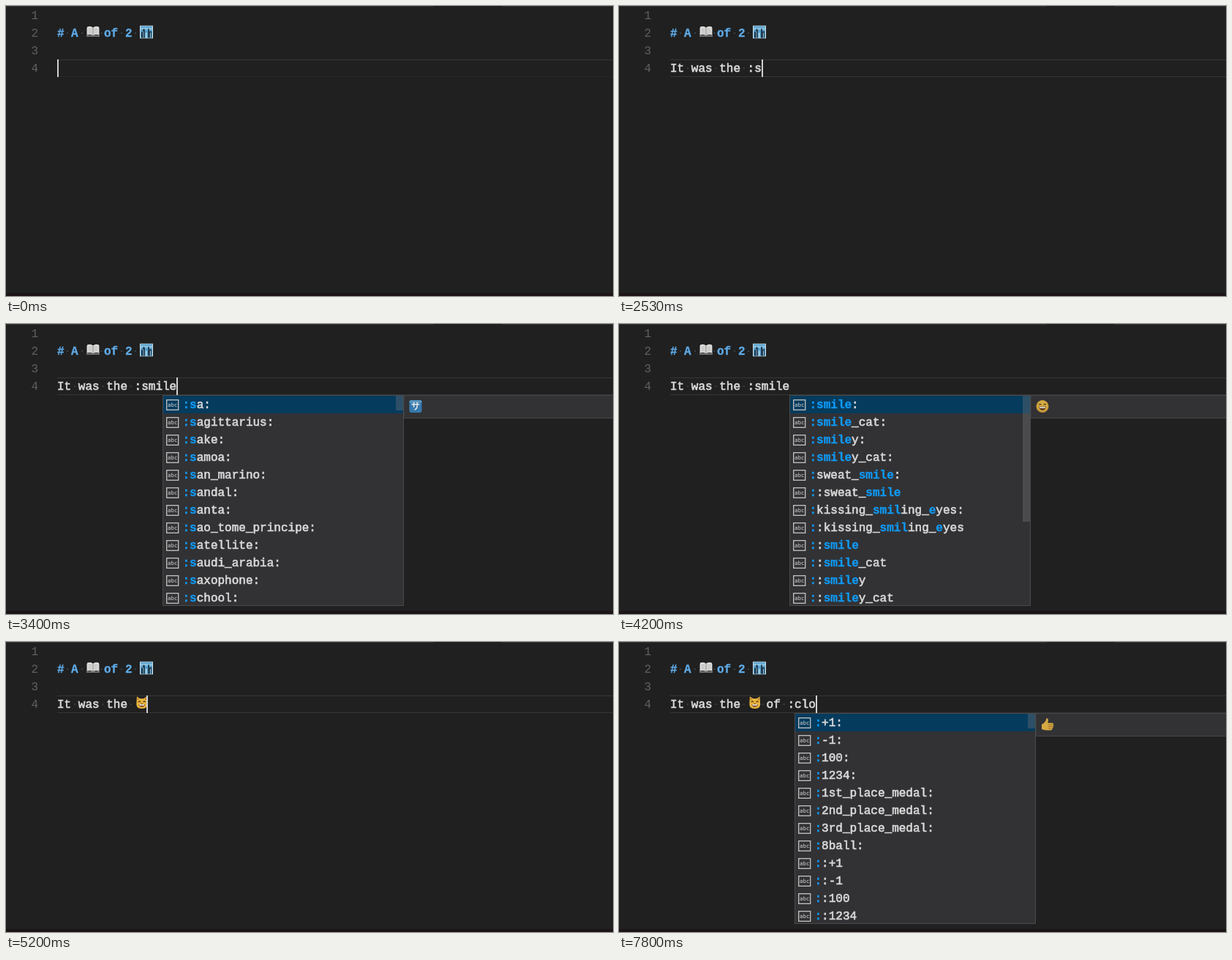
An HTML page for the animation above (8000 ms loop, 830 by 396 pixels).

```html
<!DOCTYPE html>
<html lang="en">
<head>
<meta charset="utf-8">
<title>Emoji completion in an editor</title>
<style>
  html, body { margin: 0; width: 100%; height: 100%; overflow: hidden; background: #202020; }
  svg { display: block; width: 830px; height: 396px; }
  text { font: 16px "Liberation Mono", "DejaVu Sans Mono", monospace; }
  .code { fill: #d9d9d9; stroke: #d9d9d9; stroke-width: .65; }
  .num { fill: #606060; text-anchor: end; }
  .head { fill: #5fabe8; stroke: #5fabe8; stroke-width: .3; font-weight: bold; }
  .hit { fill: #0f9bf7; stroke: #0f9bf7; stroke-width: .3; font-weight: bold; }
  .abc { font: 7.5px "DejaVu Sans Mono", monospace; fill: #d2d2d2; text-anchor: middle; }
</style>
</head>
<body>
<svg viewBox="0 0 830 396">
  <defs>
    <symbol id="book" viewBox="0 0 18 18">
      <path d="M0 4 L1 3 V14 H8 L9 15 L10 14 H17 V3 L18 4 V16 H0Z" fill="#6f7174"/>
      <path d="M1 2.5 Q6 .8 9 3.5 Q12 .8 17 2.5 V13.5 Q12 12.2 9 14.5 Q6 12.2 1 13.5Z" fill="#dededc"/>
      <path d="M9 3.5 V14.5" stroke="#858585"/>
      <path d="M2.5 5 H7.5 M2.5 7 H7.5 M2.5 9 H7.5 M2.5 11 H7.5 M10.5 5 H15.5 M10.5 7 H15.5 M10.5 9 H15.5 M10.5 11 H15.5" stroke="#b0b0b0" stroke-width=".8"/>
    </symbol>
    <symbol id="city" viewBox="0 0 18 18">
      <rect width="18" height="18" fill="#c9dde6"/>
      <rect x="1" y="1" width="16" height="16" fill="#559fce"/>
      <path d="M1 3 H17 V6 H1Z" fill="#8ac2df"/>
      <path d="M2 17 V9 H4 V6 L5.5 4.5 L7 6 V17Z M11 17 V6 L12 3.5 L13 6 V8 H16 V17Z" fill="#203b50"/>
      <path d="M7.5 17 V10 H10 V17Z M14 10 H15 V17 H14Z M4.5 8 H5.3 V17 H4.5Z" fill="#9cc9df"/>
    </symbol>
    <symbol id="sa" viewBox="0 0 18 18">
      <rect x=".5" y=".5" width="17" height="17" rx="3" fill="#3585c2"/>
      <rect x=".5" y=".5" width="17" height="4" rx="2" fill="#5ba5d8"/>
      <text x="9" y="13.5" text-anchor="middle" fill="#fff" style="font:bold 12.5px 'Noto Sans CJK JP','Noto Sans CJK',sans-serif">サ</text>
    </symbol>
    <symbol id="grin" viewBox="0 0 18 18">
      <circle cx="9" cy="9" r="8.6" fill="#d99c30"/>
      <circle cx="9" cy="8.2" r="7.5" fill="#eebf45"/>
      <path d="M4.2 7 Q5.7 4.6 7.2 7 M10.8 7 Q12.3 4.6 13.8 7" fill="none" stroke="#553313" stroke-width="1.2"/>
      <path d="M4 9.3 H14 Q13.4 14.4 9 14.4 Q4.6 14.4 4 9.3Z" fill="#6b3d17"/>
      <path d="M4.7 9.8 H13.3 L12.8 11.6 H5.2Z" fill="#f4f0e4"/>
    </symbol>
    <symbol id="cat" viewBox="0 0 18 18">
      <path d="M1.5 9 L2 .6 L6.5 3.4 H11.5 L16 .6 L16.5 9 Q18 17.4 9 17.4 Q0 17.4 1.5 9Z" fill="#e9b53d"/>
      <path d="M2.7 5.5 L3 2.4 L5.3 4Z M15.3 5.5 L15 2.4 L12.7 4Z" fill="#a86a2b"/>
      <path d="M4 8.3 Q5.5 5.6 7 8.3 M11 8.3 Q12.5 5.6 14 8.3" fill="none" stroke="#49300f" stroke-width="1.3"/>
      <path d="M4.5 11 Q6.5 11.6 9 10.6 Q11.5 11.6 13.5 11 Q13 15 9 15 Q5 15 4.5 11Z" fill="#6b3d17"/>
      <path d="M5.2 11.6 Q9 11.6 12.8 11.6 L12 13.2 H6Z" fill="#fff"/>
      <path d="M8 9.2 H10 L9 10.4Z" fill="#7d4a24"/>
    </symbol>
    <symbol id="thumb" viewBox="0 0 18 18">
      <path d="M1 9 Q4.5 7.5 6.5 4 L7.5 .8 Q10.3 .3 9.8 4 L9.3 7 H15.5 Q17.5 7.3 16.8 9.2 Q18 10.5 16.6 12 Q17 13.8 15.6 14.4 Q15.8 16.8 13 17 H7 Q4 16.8 1 15.5Z" fill="#f0bd45"/>
      <path d="M10 9.5 H16.5 M10 12 H16.5 M10 14.5 H15.5" stroke="#a8742a" stroke-width=".9"/>
    </symbol>
  </defs>
  <rect width="830" height="396" fill="#202020"/>
  <path d="M0 .5 H585 M678 .5 H830" stroke="#353535"/>
  <rect y="392" width="830" height="4" fill="#1c1417"/>
  <path d="M70 73.5 H830" stroke="#353535"/>
  <path id="under" d="M70 96.5 H830" stroke="#353535"/>
  <g id="page"></g>
  <g id="line"></g>
  <rect id="caret" y="73" width="2" height="24" fill="#d0d0d0"/>
  <g id="menus"></g>
</svg>
<script>
const LOOP = 8000, LEFT = 70, CH = 9.6, CAT_W = 16.4, ROW = 24;
const $ = id => document.getElementById(id);

function add(parent, tag, attrs, content) {
  const el = document.createElementNS('http://www.w3.org/2000/svg', tag);
  for (const k in attrs) el.setAttribute(k, attrs[k]);
  if (content !== undefined) el.textContent = content;
  parent.appendChild(el);
  return el;
}
const emoji = (parent, name, x, y, size = 18, opacity = 1) =>
  add(parent, 'use', { href: '#' + name, x, y, width: size, height: size, opacity });
const dot = (parent, x, y, fill) => add(parent, 'circle', { cx: x, cy: y, r: 1.1, fill });

// Fixed page: line numbers and heading
const page = $('page');
for (let i = 0; i < 4; i++) add(page, 'text', { class: 'num', x: 44, y: 18 + ROW * i }, i + 1);
[['#', 70], ['A', 89], ['of', 134], ['2', 163]].forEach(([s, x]) =>
  add(page, 'text', { class: 'head', x, y: 42 }, s));
[84, 104, 130.5, 158, 177].forEach(x => dot(page, x, 37, '#3a4a56'));
emoji(page, 'book', 110, 26);
emoji(page, 'city', 183, 26.5);

// Typed line: [time, text], '@' stands for the cat
const steps = [[0, '']];
const type = (text, ...times) => {
  let s = steps[steps.length - 1][1];
  times.forEach((t, i) => steps.push([t, s += text[i]]));
};
type('It ', 500, 670, 730);
type('was', 1000, 1130, 1270);
type(' the ', 1470, 1530, 1600, 1670, 1730);
type(':s', 2000, 2470);
type('mile', 3000, 3070, 3130, 3270);
steps.push([5070, 'It was the @']);
type(' of ', 5530, 6000, 6070, 6130);
type(':clo', 6530, 7400, 7530, 7670);

const hidden = [[3730, 4270], [4730, 5070]];  // caret blinked off

// Menus: square brackets mark matched letters
const menus = [
  { from: 3200, to: 3600, x: 214, thumb: 20, docs: ['sa'],
    rows: 'a: agittarius: ake: amoa: an_marino: andal: anta: ao_tome_principe: atellite: audi_arabia: axophone: chool:'
      .split(' ').map(s => '[:s]' + s) },
  { from: 3600, to: 5070, x: 233, thumb: 172, docs: ['grin', 'cat'], down: 4470,
    rows: ('[:smile]: [:smile]_cat: [:smile]y: [:smile]y_cat: [:]sweat_[smile]: [:]:sweat_[smile] ' +
      '[:]kissing_[smil]ing_[e]yes: [:]:kissing_[smil]ing_[e]yes [:]:[smile] [:]:[smile]_cat [:]:[smile]y [:]:[smile]y_cat').split(' ') },
  { from: 7330, to: LOOP, x: 240, thumb: 20, docs: ['thumb'],
    rows: '+1: -1: 100: 1234: 1st_place_medal: 2nd_place_medal: 3rd_place_medal: 8ball: :+1 :-1 :100 :1234'
      .split(' ').map(s => '[:]' + s) }
];

function buildMenu(m) {
  const { x } = m, g = m.el = add($('menus'), 'g', {});
  add(g, 'rect', { x: x + 330, y: 97.5, width: 840 - x - 330, height: 31, fill: '#323235', stroke: '#454547' });
  m.icon = emoji(g, m.docs[0], x + 337, 103.5, 18, .86);
  add(g, 'rect', { x: x + .5, y: 97.5, width: 329, height: 287, fill: '#323235', stroke: '#4a4a4c' });
  m.bar = add(g, 'rect', { x: x + 1, width: 328, height: ROW, fill: '#053b5d' });
  add(g, 'rect', { x: x + 319, y: 98, width: 10, height: m.thumb, fill: '#797979', opacity: .35 });
  m.rows.forEach((row, i) => {
    const y = 110 + ROW * i;
    add(g, 'rect', { x: x + 5.7, y: y - 6.3, width: 16, height: 13.6, fill: 'none', stroke: '#c4c4c4', 'stroke-width': 1.3 });
    add(g, 'text', { class: 'abc', x: x + 13.7, y: y + 3.4 }, 'abc');
    const line = add(g, 'text', { class: 'code', x: x + 27.5, y: y + 5 });
    row.split(/[\[\]]/).forEach((part, k) => {
      if (part) add(line, 'tspan', k % 2 ? { class: 'hit' } : {}, part);
    });
  });
}
menus.forEach(buildMenu);

let shown = null;
function setLine(s) {
  if (s === shown) return;
  shown = s;
  const g = $('line');
  g.textContent = '';
  let x = LEFT;
  for (const c of s) {
    if (c === '@') emoji(g, 'cat', x + 1.4, 74, 17.5);
    else if (c === ' ') dot(g, x + CH / 2, 85, '#444');
    else add(g, 'text', { class: 'code', x, y: 90 }, c);
    x += c === '@' ? CAT_W : CH;
  }
  $('caret').setAttribute('x', Math.round(x));
}

function render(t) {
  setLine(steps.filter(([at]) => at <= t).pop()[1]);
  $('caret').style.display = hidden.some(([a, b]) => t >= a && t < b) ? 'none' : '';
  $('under').setAttribute('opacity', t < 200 ? .4 : 1);
  for (const m of menus) {
    m.el.style.display = t >= m.from && t < m.to ? '' : 'none';
    const pick = m.down && t >= m.down ? 1 : 0;
    m.bar.setAttribute('y', 98 + ROW * pick);
    m.icon.setAttribute('href', '#' + m.docs[pick]);
  }
}

const start = performance.now();
function tick() {
  render((performance.now() - start) % LOOP);
  requestAnimationFrame(tick);
}
tick();
</script>
</body>
</html>
```
